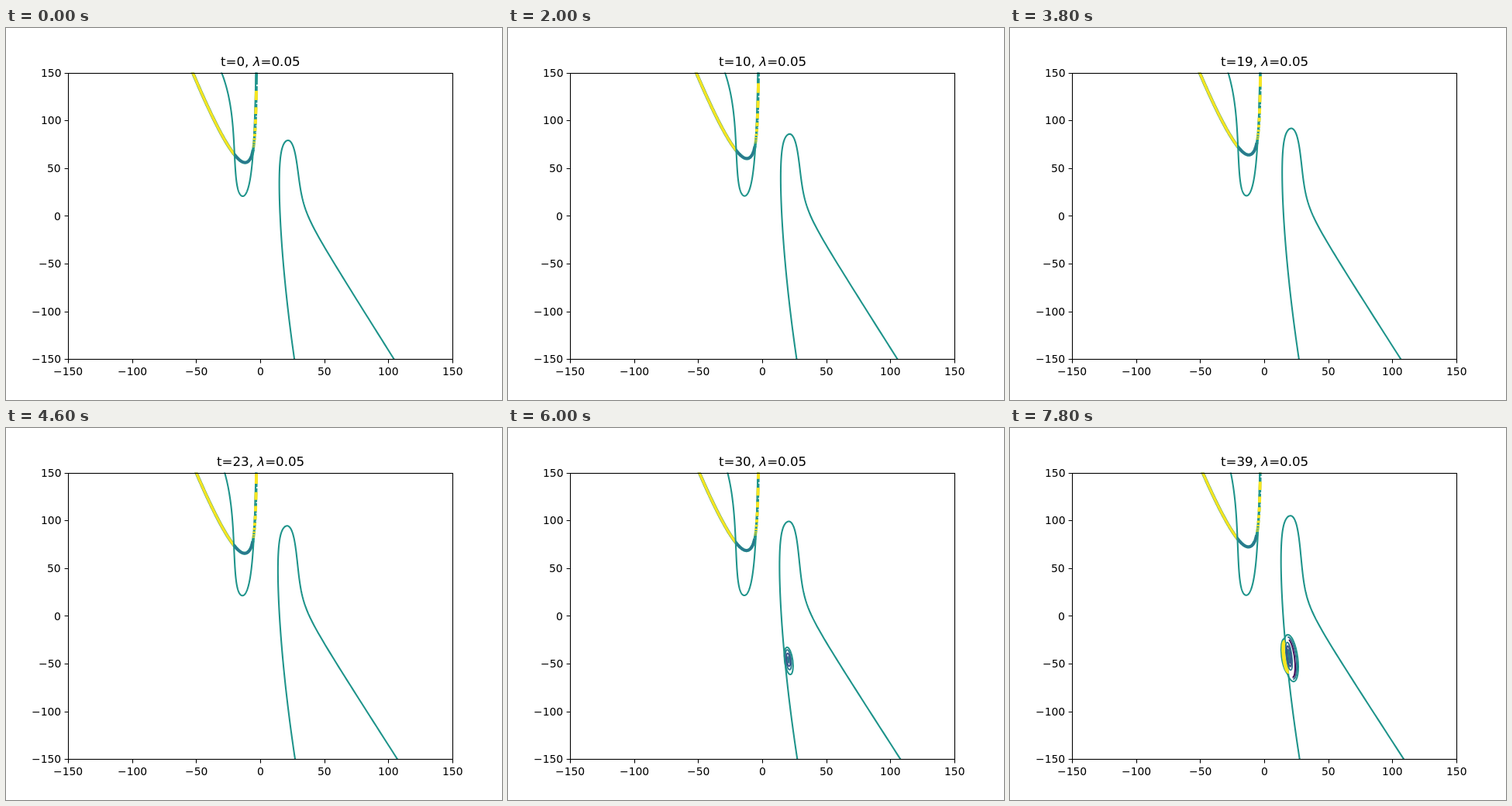
Recreate the animation shown at these times as an HTML page with a canvas. Size 640x480 px, loop 8000 ms.

```html
<!DOCTYPE html>
<html lang="en">
<head>
<meta charset="utf-8">
<title>Contour plot</title>
<style>
  html, body { margin: 0; width: 100%; height: 100%; overflow: hidden; background: #fff; }
  canvas { display: block; }
</style>
</head>
<body>
<canvas id="plot" width="640" height="480"></canvas>
<script>
const ctx = document.getElementById('plot').getContext('2d');
const STEP = 200, STEPS = 40;
const TEAL = '#1f948b', BLUE = '#2a788e', INDIGO = '#3b4d8a', PURPLE = '#440f5c', YELLOW = '#f8e621';
const FONT = '"DejaVu Sans", sans-serif';
const HALF = Math.PI / 2;

const lerp = (a, b, p) => a + (b - a) * p;
// Rises like a root and levels off at 1
const level = (d, k) => Math.sqrt(d / (d + k));
// Bends from flat to a slope of 1 around d0
const ramp = (d, d0, soft) => (d - d0 + Math.hypot(d - d0, soft)) / 2;

// A curve has a tip, a direction (1 down, -1 up) and the width of
// its left and right limbs at the distance d from the tip.
function rightCurve(p) {
  const d0 = lerp(88, 112, p), slope = lerp(0.63, 0.65, p), s = lerp(16, 17.2, p);
  return {
    x: lerp(364, 362, p), y: lerp(145, 113.2, p), dir: 1,
    left: d => s * level(d, 33) - 23.2 * (d / 282) ** 1.77,
    right: d => 16.5 * level(d, 45) + slope * (ramp(d, d0, 34) - ramp(0, d0, 34))
  };
}

function innerCurve(p) {
  const x = lerp(305.5, 304.8, p), flare = lerp(15.6, 8.4, p);
  return {
    x, y: lerp(217, 215.8, p), dir: -1,
    left: d => 13 * level(d, 30) + flare * (d / 160) ** 4,
    right: d => (326.5 - x) * level(d, 85)
  };
}

function thickCurve(p) {
  const x = lerp(308.5, 307.5, p);
  return {
    x, y: lerp(173.6, 153.4, p), dir: -1,
    left: d => 3.45 * Math.sqrt(d) + 0.262 * d,
    right: d => (324.8 - x) * level(d, 24.5)
  };
}

// Samples are dense near the tip, where the curve turns
function trace({ x, y, dir, left, right }) {
  const path = new Path2D();
  const reach = Math.sqrt(dir > 0 ? 429 - y : y - 56);
  for (let i = -80; i <= 80; i++) {
    const d = (reach * i / 80) ** 2;
    path.lineTo(i < 0 ? x - left(d) : x + right(d), y + dir * d);
  }
  return path;
}

function stroke(path, color, width) {
  ctx.strokeStyle = color;
  ctx.lineWidth = width;
  ctx.stroke(path);
}

function clipped(x, y, w, h, draw) {
  ctx.save();
  ctx.beginPath();
  ctx.rect(x, y, w, h);
  ctx.clip();
  draw();
  ctx.restore();
}

function drawUpper(p) {
  const path = trace(thickCurve(p));
  const crossX = lerp(294.5, 292.7, p), crossY = lerp(157, 138, p);
  clipped(80, 50, crossX - 80, 200, () => {
    stroke(path, '#4a9a78', 4.2);
    stroke(path, YELLOW, 3.3);
  });
  clipped(crossX, crossY, 330 - crossX, 100, () => {
    stroke(path, TEAL, 4.2);
    stroke(path, BLUE, 3);
  });
  clipped(312, 50, 30, crossY - 50, () => stroke(path, TEAL, 3.4));

  // Dashes crowd together toward the crossing
  const dashes = Array.from({ length: 10 }, (_, n) => lerp(70, 88, p) * 0.72 ** n);
  ctx.fillStyle = '#fff';
  dashes.forEach(d => ctx.fillRect(320, crossY - d * 1.2, 8, d * 0.03));
  stroke(trace(innerCurve(p)), TEAL, 2.08);
  dashes.forEach(d => clipped(312, crossY - d * 1.085, 30, d * 0.17, () => stroke(path, YELLOW, 4)));
}

function oval(x, y, rx, ry, color, width, from = 0, to = 4 * HALF) {
  const path = new Path2D();
  path.ellipse(x, y, rx, ry, -0.13, from, to);
  stroke(path, color, width);
}

function drawIsland(t) {
  if (t < 26) return;
  const size = Math.sqrt((t - 25.4) / 13.6);
  const grown = Math.max(0, (t - 30) / 9);
  const rx = 9 * size, ry = 30.5 * size;
  const y = lerp(300.5, 297, grown);
  oval(362.2, y, rx, ry, TEAL, 2);
  if (grown) {
    oval(361.8, y, rx * 0.84, ry * 0.9, BLUE, 2, -HALF, HALF);
    oval(361.3, y, rx * 0.66, ry * 0.82, PURPLE, 2, -HALF * 0.8, HALF);
  }
  const cx = lerp(361.8, 360, grown), cy = lerp(299, 294.5, grown);
  [BLUE, INDIGO, BLUE].forEach((color, i) =>
    oval(cx, cy, 3.6 - 1.4 * i, lerp(13, 18, grown) - 4.5 * i, color, 1.8));
  if (grown) {
    oval(357, 294.5, lerp(2, 6.6, grown), lerp(12, 23, grown), TEAL, 2, HALF, 3 * HALF);
    oval(357.2, 295, lerp(1, 4, grown), lerp(9, 20, grown), YELLOW, lerp(2, 4.6, grown), HALF, 3 * HALF);
  }
}

// Aligns the visible ink of a run of [text, style] parts on whole pixels
function drawText(parts, size, x, y, align) {
  const runs = parts.map(([text, style]) => {
    const font = `${style} ${size}px ${FONT}`;
    ctx.font = font;
    return { text, font, box: ctx.measureText(text) };
  });
  const total = runs.reduce((sum, r) => sum + r.box.width, 0);
  const first = runs[0].box, last = runs[runs.length - 1].box;
  const inkLeft = -first.actualBoundingBoxLeft;
  const inkRight = total - last.width + last.actualBoundingBoxRight;
  let pen = Math.round(x - lerp(inkLeft, inkRight, align));
  runs.forEach(({ text, font, box }) => {
    ctx.font = font;
    ctx.fillText(text, pen, y);
    pen += box.width;
  });
}

function drawAxes() {
  ctx.strokeStyle = ctx.fillStyle = '#000';
  ctx.lineWidth = 1.1;
  ctx.strokeRect(80.5, 58.5, 496, 369);
  ctx.beginPath();
  for (let i = 0; i <= 6; i++) {
    const value = i * 50 - 150;
    const label = [[value < 0 ? '\u2212' + -value : String(value), 'normal']];
    const x = 80 + i * 496 / 6, y = 427.2 - i * 61.6;
    const sx = Math.round(x) + 0.5, sy = Math.round(y) + 0.5;
    ctx.moveTo(sx, 427.5);
    ctx.lineTo(sx, 432.4);
    ctx.moveTo(80.5, sy);
    ctx.lineTo(75.6, sy);
    drawText(label, 13.89, x, 448, 0.5);
    drawText(label, 13.89, 70.3, Math.round(y + 5.2), 1);
  }
  ctx.stroke();
}

function render(t) {
  const p = t / (STEPS - 1);
  ctx.fillStyle = '#fff';
  ctx.fillRect(0, 0, 640, 480);
  clipped(80, 57.6, 496, 369.6, () => {
    drawUpper(p);
    stroke(trace(rightCurve(p)), TEAL, 2.08);
    drawIsland(t);
  });
  drawAxes();
  drawText([[`t=${t}, `, 'normal'], ['\u03bb', 'italic'], ['=0.05', 'normal']], 16.67, 328, 49, 0.5);
}

const start = performance.now();
function tick() {
  render(Math.floor((performance.now() - start) / STEP) % STEPS);
  requestAnimationFrame(tick);
}
tick();
</script>
</body>
</html>
```
